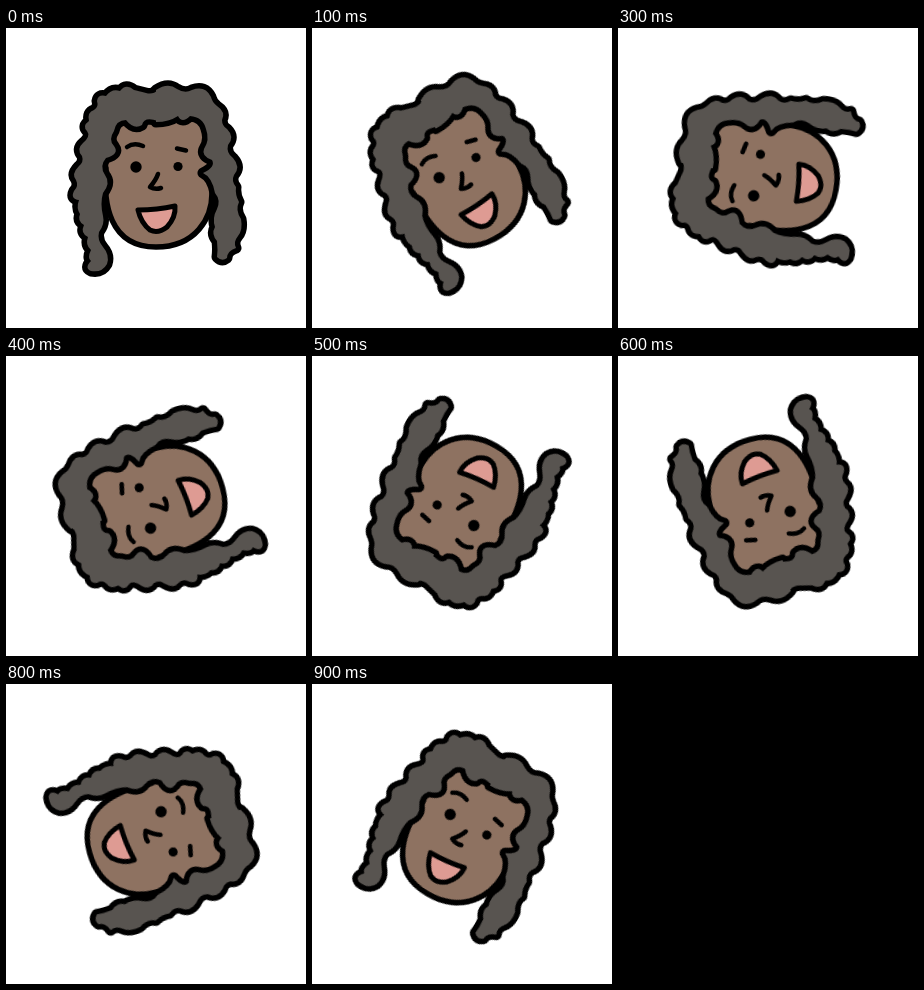
An HTML page without scripts for the animation above (1000 ms loop, 300 by 300 pixels).

```html
<!DOCTYPE html>
<html lang="en">
<head>
<meta charset="utf-8">
<title>Spinning head</title>
<style>
html, body { margin: 0; width: 100%; height: 100%; overflow: hidden; background: #fff; }
svg { display: block; width: 100%; height: 100%; }
.head {
  transform-origin: 150px 150px;
  animation: spin 1s step-end infinite;
}
.line { stroke: #000; stroke-linecap: round; stroke-linejoin: round; }
.mark { fill: none; stroke-width: 4.5; }
/* uneven turn, one pose every 100 ms */
@keyframes spin {
  0% { transform: rotate(0deg); }
  10% { transform: rotate(-28deg); }
  20% { transform: rotate(-54deg); }
  30% { transform: rotate(-80deg); }
  40% { transform: rotate(-105deg); }
  50% { transform: rotate(-150deg); }
  60% { transform: rotate(-195deg); }
  70% { transform: rotate(-241deg); }
  80% { transform: rotate(-286deg); }
  90%, 100% { transform: rotate(-330deg); }
}
</style>
</head>
<body>
<svg viewBox="0 0 300 300">
  <defs>
    <g id="hair">
      <path d="M152 62Q147 67 140 65Q132 63 128 62Q120 55 114 63Q106 60 100 68Q92 66 91 73Q93 79 88 82Q81 84 83 93Q76 98 81 103Q85 108 77 115Q70 121 76 128Q78 134 73 138Q65 146 70 152Q73 158 68 163Q64 171 73 172Q70 180 74 186Q71 193 78 197Q74 205 82 209Q79 217 85 222Q81 230 85 233Q78 240 85 243Q96 245 101 236Q104 227 97 219Q91 212 93 204Q99 196 97 188Q94 175 97 165Q105 155 99 147Q93 138 100 130Q114 126 108 118Q102 112 108 103Q110 92 120 92Q128 102 136 97Q138 88 152 93Z"/>
      <path d="M150 62Q162 54 171 61Q179 66 186 62Q199 57 205 69Q206 74 211 78Q220 84 216 92Q216 98 221 101Q229 109 222 117Q220 125 227 130Q235 139 228 147Q225 153 230 159Q229 167 233 174Q229 182 235 191Q237 202 232 208Q227 214 230 220Q221 223 221 230Q216 234 211 229Q212 222 211 213Q205 206 209 199Q206 190 211 181Q215 172 209 165Q206 149 197 145Q210 139 206 132Q195 128 198 121Q204 112 200 101Q197 89 184 88Q176 96 172 88Q163 94 150 94Z"/>
    </g>
  </defs>
  <g class="head">
    <path class="line" fill="#8e7261" stroke-width="5.5" d="M100 140C97 175 103 219 150 219C190 219 206 190 206 165L209 135L203 89H112L104 110L98 134Z"/>
    <g fill="#585450">
      <use href="#hair" class="line" stroke-width="11"/>
      <use href="#hair"/>
    </g>
    <circle cx="130" cy="139" r="5.7"/>
    <circle cx="172" cy="138.5" r="4.6"/>
    <path class="line mark" d="M121 119Q128 114 137 118"/>
    <path class="line mark" d="M171 120.5L180 122.5"/>
    <path class="line mark" d="M152 146Q150 152 144 159Q149 162 155 160"/>
    <path class="line" fill="#de9b93" stroke-width="5" d="M132 182Q151 182 169 178Q170 189 161 199Q152 206 144 202Q135 195 132 182Z"/>
  </g>
</svg>
</body>
</html>
```
